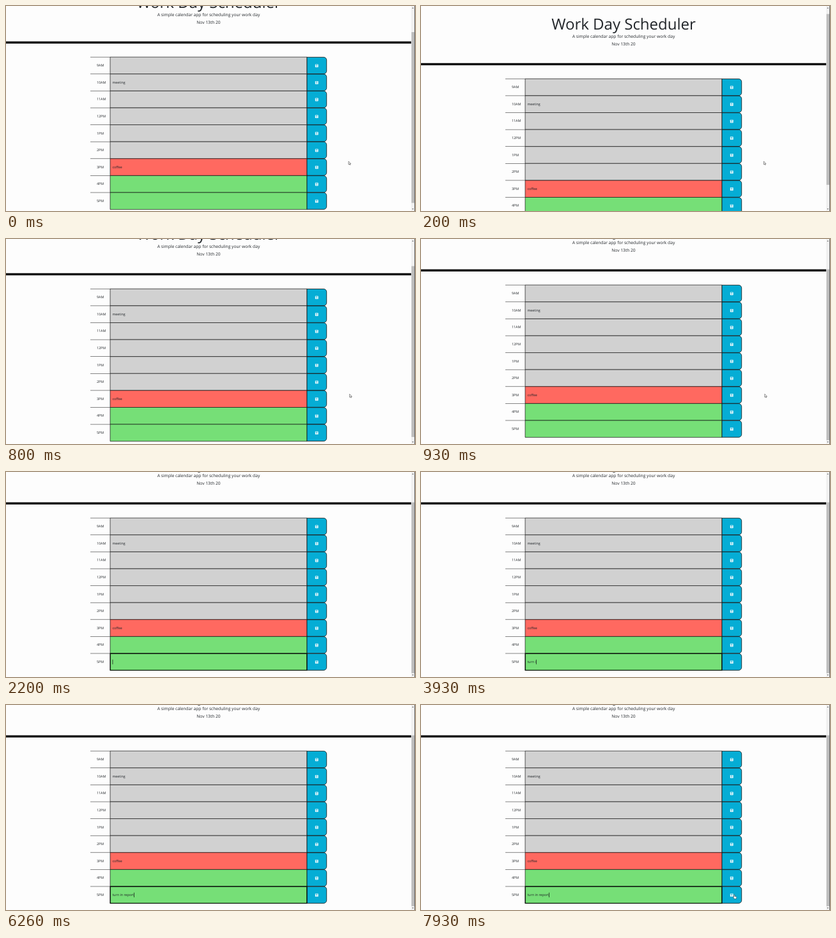
Recreate the animation shown at these times as an HTML page with a canvas. Size 640x322 px, loop 8000 ms.

```html
<!DOCTYPE html>
<html lang="en">
<head>
<meta charset="utf-8">
<title>Work Day Scheduler</title>
<style>
html, body { margin: 0; width: 100%; height: 100%; overflow: hidden; background: #fdfdfd; }
canvas { display: block; width: 640px; height: 322px; }
</style>
</head>
<body>
<canvas id="stage" width="640" height="322"></canvas>
<script>
const ctx = document.getElementById('stage').getContext('2d');
const W = 640, H = 322, LOOP = 8000;
const FONT = '"Open Sans", "Noto Sans", sans-serif';
const INK = '#212529', PAST = '#d1d1d1', NOW = '#ff6960', NEXT = '#76df77', BLUE = '#05add5';
const TOP = 122.2, ROW = 26.6, LEFT = 132, FIELD = 163, BUTTON = 471, RIGHT = 501.7;
const MAX_SCROLL = 50;
const HOURS = ['9AM', '10AM', '11AM', '12PM', '1PM', '2PM', '3PM', '4PM', '5PM'];
const NOTES = { 1: 'meeting', 6: 'coffee' };
const ENTRY = 'turn in report';
const FOCUS = 1930;
const KEYS = [2930, 3130, 3260, 3400, 3600, 3800, 4000, 4060, 4130, 4200, 4260, 4530, 4660, 4800];

// [time, x, y] pointer stops
const POINTER = [
  [0, 536, 244], [600, 537.3, 244], [930, 537.8, 243.5], [1050, 537.8, 243.5],
  [1750, 330, 299], [6900, 330, 299], [7550, 478, 299], [7800, 489.6, 297.5], [LOOP, 489.6, 297.5]
];

const clamp = v => Math.max(0, Math.min(1, v));
const easeOut = v => 1 - (1 - clamp(v)) ** 3;
const smooth = v => v * v * (3 - 2 * v);

function scrollAt(t) {
  if (t < 680) return 42 * (1 - easeOut((t - 30) / 400));
  return MAX_SCROLL * easeOut((t - 680) / 240);
}

function pointerAt(t) {
  const i = POINTER.findIndex((p, k) => k && t <= p[0]);
  const [t0, x0, y0] = POINTER[i - 1], [t1, x1, y1] = POINTER[i];
  const k = smooth((t - t0) / (t1 - t0));
  return [x0 + (x1 - x0) * k, y0 + (y1 - y0) * k];
}

function rect(x, y, w, h, color) {
  ctx.fillStyle = color;
  ctx.fillRect(x, y, w, h);
}

function text(str, x, y, size, align = 'left') {
  ctx.font = `${size}px ${FONT}`;
  ctx.textAlign = align;
  ctx.fillStyle = INK;
  ctx.fillText(str, x, y);
}

function outlined(path, fill, stroke, width) {
  ctx.fillStyle = fill;
  ctx.fill(path);
  ctx.strokeStyle = stroke;
  ctx.lineWidth = width;
  ctx.stroke(path);
}

function saveIcon(cx, cy) {
  ctx.fillStyle = '#f4fbfd';
  ctx.beginPath();
  ctx.roundRect(cx - 2.4, cy - 2.2, 4.8, 4.8, 0.6);
  ctx.fill();
  rect(cx - 1.4, cy - 1.5, 2.5, 1.1, BLUE);
  ctx.fillStyle = BLUE;
  ctx.beginPath();
  ctx.arc(cx, cy + 1.1, 0.75, 0, 7);
  ctx.fill();
}

function drawRow(i, y) {
  const color = i < 6 ? PAST : i === 6 ? NOW : NEXT;
  rect(LEFT, y - 0.3, FIELD - LEFT, 0.6, '#333');
  text(HOURS[i], 142, y + 14.9, 5.33);

  const field = new Path2D();
  field.rect(FIELD, y, BUTTON - FIELD, ROW);
  outlined(field, color, '#111', 0.7);
  if (NOTES[i]) text(NOTES[i], 166.4, y + 15.3, 5.33);

  const button = new Path2D();
  button.roundRect(BUTTON, y + 0.2, RIGHT - BUTTON, ROW - 0.4, [0, 4.6, 4.6, 0]);
  outlined(button, BLUE, '#111', 0.8);
  saveIcon(486.2, y + 13.4);
}

function drawEntry(t, y) {
  if (t < FOCUS) return;
  ctx.strokeStyle = '#0a140a';
  ctx.lineWidth = 1.2;
  ctx.strokeRect(FIELD + 0.2, y + 0.2, BUTTON - FIELD - 0.4, ROW - 0.4);

  const typed = KEYS.filter(k => k <= t).length;
  const str = ENTRY.slice(0, typed);
  text(str, 166.4, y + 15.3, 5.33);
  const since = t - (typed ? KEYS[typed - 1] : FOCUS);
  if (since % 1000 < 500) {
    rect(166.6 + ctx.measureText(str).width, y + 9.7, 0.7, 7.4, '#111');
  }
}

function triangle(x, y, dir) {
  ctx.fillStyle = '#505050';
  ctx.beginPath();
  ctx.moveTo(x - 1.3, y + dir * 0.7);
  ctx.lineTo(x + 1.3, y + dir * 0.7);
  ctx.lineTo(x, y - dir * 0.8);
  ctx.fill();
}

function drawScrollbar(scroll) {
  const track = H - 12, page = H + MAX_SCROLL;
  rect(634, 0, 5.3, H, '#f1f1f1');
  rect(634.5, 6 + track * scroll / page, 4.5, track * H / page, '#bdbdbd');
  rect(639.2, 0, 0.8, H, '#444');
  triangle(636.6, 3, 1);
  triangle(636.6, H - 3, -1);
}

const ARROW = new Path2D('M0 0V5L1.2 4L2 5.7L2.9 5.3L2.1 3.7H3.7Z');
const HAND = new Path2D('M0 .6Q.7-.3 1.3.6V3L3.7 3.6Q4.4 3.9 4.2 4.8L3.6 7H.8L-1.2 4.4Q-1.2 3.6-.4 3.9L0 4.3Z');
const BEAM = new Path2D('M-1-2.8H1M0-2.8V2.8M-1 2.8H1');

function drawPointer(t) {
  if (t > 2050 && t < 6900) return;
  const [x, y] = pointerAt(t);
  ctx.save();
  ctx.translate(x, y);
  if (x > RIGHT) outlined(ARROW, '#fff', '#444', 0.6);
  else if (x > BUTTON) outlined(HAND, '#fff', '#222', 0.5);
  else {
    ctx.strokeStyle = '#222';
    ctx.lineWidth = 0.5;
    ctx.stroke(BEAM);
  }
  ctx.restore();
}

function draw(t) {
  const scroll = scrollAt(t);
  rect(0, 0, W, H, '#fdfdfd');
  ctx.textRendering = 'geometricPrecision';

  text('Work Day Scheduler', 317, 45 - scroll, 24, 'center');
  text('A simple calendar app for scheduling your work day', 317, 57.9 - scroll, 6.67, 'center');
  text('Nov 13th 20', 317, 69.9 - scroll, 6.67, 'center');
  rect(0, 97.6 - scroll, 634, 3.4, '#000');

  HOURS.forEach((_, i) => drawRow(i, TOP + i * ROW - scroll));
  drawEntry(t, TOP + 8 * ROW - scroll);
  drawScrollbar(scroll);
  drawPointer(t);
}

const start = performance.now();
function tick() {
  draw((performance.now() - start) % LOOP);
  requestAnimationFrame(tick);
}
tick();
</script>
</body>
</html>
```
